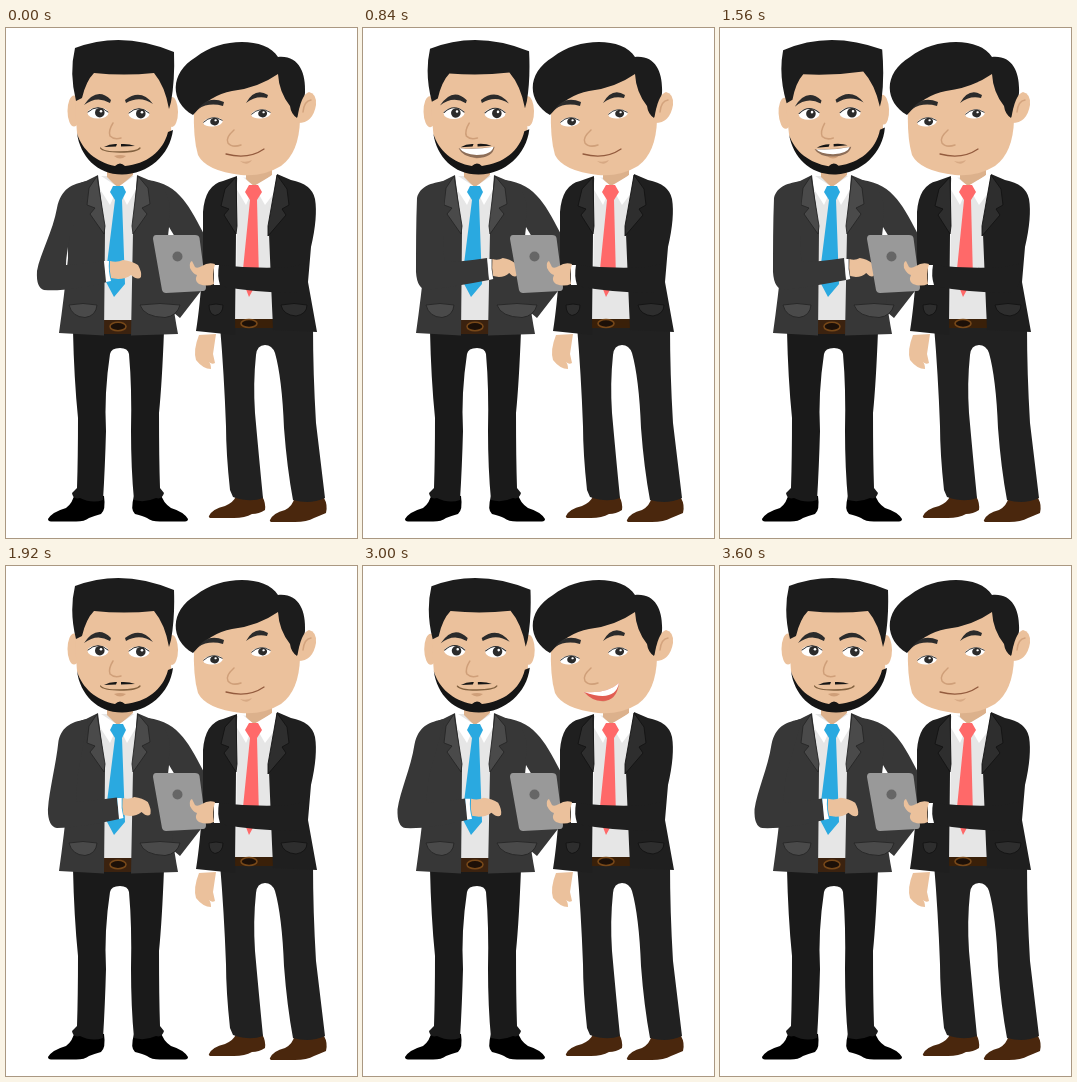
Recreate the animation shown at these times as an HTML page. Size 351 by 510 pixels, loop 3.84 s.

```html
<!DOCTYPE html>
<html lang="en">
<head>
<meta charset="utf-8">
<title>Two colleagues with a tablet</title>
<style>
  html, body { margin: 0; height: 100%; overflow: hidden; background: #fff; }
  svg { display: block; width: 100vw; height: 100vh; }
  .line { fill: none; stroke-linecap: round; stroke-linejoin: round; }
  .skin { fill: #ebc19c; }
  .coatA { fill: #373737; } .coatB { fill: #1f1f1f; }
  .legA { fill: #1a1a1a; } .legB { fill: #212121; }
  .shirt { fill: #e6e6e6; } .white { fill: #fff; }
  .hair { fill: #1c1c1c; } .iris { fill: #2b2b2b; }
  .lapelA { fill: #4a4a4a; stroke: #262626; stroke-width: .9; }
  .lapelB { fill: #2e2e2e; stroke: #141414; stroke-width: .9; }
  .buckle { fill: #1c1008; stroke: #774819; stroke-width: 1.6; }
</style>
</head>
<body>
<svg viewBox="0 0 351 510" preserveAspectRatio="none">
  <defs>
    <g id="eye">
      <ellipse class="white" rx="10.5" ry="5.6"/>
      <circle class="iris" cx="1.8" cy="-.3" r="4.8"/>
      <circle class="white" cx="3" cy="-1.8" r="1.3"/>
      <path class="line" stroke="#2b2b2b" stroke-width="1" d="M-10 -1Q0 -10 10 -1"/>
    </g>
  </defs>

  <!-- bearded man: body -->
  <g>
    <path d="M42 491Q46 484 60 480Q67 475 69 464L98 468Q100 482 95 486Q88 488 83 490Q78 494 68 493.500H45Q42 493 42 491Z"/>
    <path d="M182 491Q178 484 165 480Q157 475 154 464L128 468Q124 482 129 486Q137 488 141 490Q146 494 156 493.500H179Q182 493 182 491Z"/>
    <path class="legA" d="M67 303L158 303Q156 355 153 385Q153 430 154 460L158 465Q156 472 150 470Q139 475 128 472Q125 440 125 403Q126 360 123 326Q122 320 114 320Q105 320 104 326Q98 365 100 403Q99 440 97 472Q86 476 74 470Q67 472 66 465L71 460Q72 430 72 390Q68 350 67 303Z"/>
    <path class="coatA" d="M142 152C174 156 184 180 199 208L198 259L174 290L156 275Z"/>
    <path class="white" d="M163 199L169 209L162 208Z"/>
    <path class="shirt" d="M92 148L131 148L128 294H97Z"/>
    <path fill="#3b220f" d="M97 292H127V306H97Z"/>
    <ellipse class="buckle" cx="112" cy="298.500" rx="8" ry="4.200"/>
    <path fill="#dcb18c" d="M101 141H127V147L112 160L101 149Z"/>
    <path class="white" d="M92 146L112 159L104 177L92 158ZM131 146L112 159L121 177L131 160Z"/>
    <path fill="#2aa9e0" d="M107 158H117L120 164L116 172L119 256L108 269L99 252L109 172L104 164Z"/>
    <path class="coatA" d="M92 147L80 153Q64 157 61 174L62 230Q58 270 53 305L98 307.500L99 204Z"/>
    <path class="coatA" d="M131 147L145 153Q160 157 164 178L161 215Q165 270 172 306L125 307.500L127 204Z"/>
    <path class="lapelA" d="M91 148L83 160L81 177L89 180L84 186L98 206L99 198Z"/>
    <path class="lapelA" d="M132 148L142 160L144 176L136 180L141 186L127 206L126 198Z"/>
    <path class="lapelA" d="M63 277Q77 274 91 277Q90 288 79 289.500Q66 289 63 277ZM134 277Q154 274 174 277Q171 288 159 289.500Q138 289 134 277Z"/>
    <path class="coatA" id="sleeve"/>
  </g>

  <!-- bearded man: head -->
  <g id="head">
    <ellipse class="skin" cx="68" cy="83" rx="6.500" ry="15.500"/>
    <ellipse class="skin" cx="166" cy="84" rx="6" ry="15"/>
    <path class="skin" d="M72 42H162Q167 75 165 104C161 124 142 143 117 143C92 143 76 124 71 105Q68 75 72 42Z"/>
    <path class="hair" d="M69 20Q116 2 168 24Q169 52 165 74L163 81Q159 58 148 45Q118 48 88 45Q80 53 76 70L70 73Q63 45 69 20Z"/>
    <path fill="#151515" d="M71 105C76 122 90 134 109 138Q114 133 119 138C140 136 157 124 162 104L167 102C164 127 142 146.500 116 146.500C91 146.500 74 128 71 105Z"/>
    <use href="#eye" x="92" y="85"/>
    <use href="#eye" x="133" y="86"/>
    <path class="iris" d="M78 77Q91 58 105 72L104 75Q91 67 78 77ZM119 72Q135 60 147 76Q134 67 120 75Z"/>
    <path class="line" stroke="#cf9f79" stroke-width="1.500" d="M107 95Q102 103 104 108Q108 112 115 110"/>
    <path fill="#cf9f79" d="M108 128Q114 126 120 128Q114 133 108 128Z"/>
    <path class="line" id="lipsA" stroke="#82613f" stroke-width="1.300" d="M94.500 120Q97 124 114 124Q131 124 134 120"/>
    <path id="mouthA" fill="#8d6e58"/>
    <path class="white" id="teethA"/>
    <path fill="#151515" d="M98 119Q104 115.500 111 116L110 118.500ZM115 116Q123 115.500 129 118L115 118.500Z"/>
  </g>

  <!-- clean-shaven man: body -->
  <g>
    <path class="skin" d="M193 307Q187 322 190 332Q197 341 205 341Q205 336 203 334Q206 337 209 335L207 326L210 306Z"/>
    <path fill="#4a270d" d="M203 488Q206 481 219 478Q228 474 230 468L256 468Q260 475 259 482Q253 486 246 486Q239 490 228 490H206Q202 490 203 488ZM264 492Q267 485 279 482Q287 478 289 468L318 470Q322 477 320 485Q313 488 308 490Q301 494 289 494H267Q263 494 264 492Z"/>
    <path class="legB" d="M214 298L307 298Q307 345 310 395L319 470Q304 477 287 472Q281 440 278 400Q276 350 269 325Q266 317 259 317Q251 317 250 327Q247 355 249 385Q253 430 257 470Q244 475 227 469L224 462Q220 425 220 398Q218 345 214 298Z"/>
    <path class="shirt" d="M231 150L270 148L266 292H230Z"/>
    <path fill="#3a2009" d="M229 291H268V300H229Z"/>
    <ellipse class="buckle" cx="243" cy="295.500" rx="8" ry="4"/>
    <path fill="#dcb18c" d="M240 141H266V147L248 160L240 151Z"/>
    <path class="white" d="M233 146L248 158L240 177L230 160ZM270 145L248 158L259 177L272 160Z"/>
    <path fill="#ff6969" d="M243 157H252L256 164L251 172L253 251L243 269L236 251L244 172L239 164Z"/>
    <path class="coatB" d="M231 148L217 153Q199 157 197 184L197 235Q194 278 190 303L229 307L230 206Z"/>
    <path class="coatB" d="M271 146L285 152Q306 156 309 171Q312 189 305 219L302 254L311 304L267 302L263 206Z"/>
    <path class="lapelB" d="M230 149L219 161L215 178L223 181L218 187L230 206L231 198Z"/>
    <path class="lapelB" d="M271 147L281 161L283 177L276 181L280 187L262 208L262 198Z"/>
    <path class="lapelB" d="M203 277Q210 275 217 277Q217 286 209 287.500Q203 286 203 277ZM275 277Q288 274 301 277Q301 286 290 288Q277 287 275 277Z"/>
    <path class="coatB" d="M212 237Q250 241 284 239L303 235Q301 262 290 265Q252 265 213 258Z"/>
  </g>

  <!-- clean-shaven man: head -->
  <g>
    <path class="skin" d="M188 82Q198 50 272 42Q294 65 294 92Q293 125 275 138Q257 149 235 147Q200 143 192 127Q187 110 188 82Z"/>
    <path class="hair" d="M187 87C164 74 163 45 190 29C215 9 260 9 272 29C293 27 300 45 299 65Q297 84 291 90Q285 86 284 78Q273 64 272 46Q252 60 226 63Q204 67 187 87Z"/>
    <path class="skin" d="M291 92Q295 66 303 64Q311 66 310 77Q307 95 292 95Z"/>
    <path class="line" stroke="#d3a37d" stroke-width="1.500" d="M297 84Q298 73 305 72"/>
    <use href="#eye" transform="translate(207 94) rotate(-6) scale(.93 .8)"/>
    <use href="#eye" transform="translate(255 86) rotate(-6) scale(.93 .8)"/>
    <path class="iris" d="M192 81Q202 67 218 74L217 78Q203 74 192 81ZM240 75Q249 59 262 67L261 70Q250 67 240 75Z"/>
    <path class="line" stroke="#cf9f79" stroke-width="1.500" d="M228 102Q219 110 222 115Q226 120 235 117"/>
    <path fill="#d7a984" d="M234 133Q240 135 246 132Q241 139 234 133Z"/>
    <path class="line" id="lipsB" stroke="#935b3e" stroke-width="1.300" d="M220 126Q242 132 258 121"/>
    <path id="mouthB" fill="#e15d52"/>
    <path class="white" id="teethB"/>
  </g>

  <!-- hands and tablet -->
  <g id="hand">
    <path class="white" d="M98 233H103Q102 243 105 253L100 254Z"/>
    <path class="skin" d="M104 233Q111 235 117 232Q126 233 132 237Q136 244 135 249Q132 253 125 247Q120 251 112 251L105 250Q103 242 104 233Z"/>
  </g>
  <path fill="#999" d="M150 207L189 207Q193 207 193.500 210L200 259Q200 263 197 263L160 265Q157 265 156 262L147 211Q147 207 150 207Z"/>
  <circle cx="171.500" cy="228.500" r="5" fill="#666"/>
  <path class="white" d="M208 237H213Q211 248 214 257L208 257Z"/>
  <path class="skin" d="M209 236Q202 234 196 238Q191 241 189 239L186 233Q183 234 184 240Q187 246 191 247Q188 253 193 256Q201 259 208 256Q206 246 209 236Z"/>
</svg>
<script>
const LOOP = 3840, STEP = 120;
const $ = id => document.getElementById(id);

// linear keyframes: [time, value] pairs
function track(t, keys) {
  const i = keys.findIndex(k => k[0] > t);
  if (i < 0) return keys[keys.length - 1][1];
  if (!i) return keys[0][1];
  const [t0, a] = keys[i - 1], [t1, b] = keys[i];
  return a + (b - a) * (t - t0) / (t1 - t0);
}

// blend two paths that share the same commands
function blend(from, to, p) {
  const ends = to.match(/[\d.]+/g);
  let i = 0;
  return from.replace(/[\d.]+/g, n => +n + (ends[i++] - n) * p);
}

const shapes = {
  sleeve: [
    "M82 153C65 156 55 161 51 180C47 203 34 226 31 243Q30 260 38 262Q60 264 101 254L98 233Q75 236 60 237Q60 228 64 208Z",
    "M82 153C68 155 57 158 54 170C53 195 53 220 53 244Q54 261 64 262Q90 259 126 252L124 230Q98 234 82 234Q80 225 80 208Z"],
  mouthA: ["M95 121Q114 124 134 121Q130 124 114 124Q99 124 95 121Z", "M96 120Q114 121 132 119Q130 130 114 130Q100 129 96 120Z"],
  teethA: ["M98 122Q114 124 131 122Q128 123 114 124Q101 123 98 122Z", "M97 120Q114 122 131 119Q129 127 114 127Q101 126 97 120Z"],
  mouthB: ["M220 126Q242 132 258 121Q245 131 238 130Q230 130 220 126Z", "M221 126Q244 128 256 117Q254 135 239 135Q229 135 221 126Z"],
  teethB: ["M222 127Q242 132 256 122Q242 131 222 127Z", "M221 126Q244 128 256 117Q252 137 221 126Z"]
};
const morph = (id, p) => $(id).setAttribute("d", blend(...shapes[id], p));

function talk(side, open) {
  for (const part of ["mouth", "teeth"]) {
    morph(part + side, open);
    $(part + side).style.opacity = open > 0 ? 1 : 0;
  }
  $("lips" + side).style.opacity = open > 0.3 ? 0 : 1;
}

function draw(now) {
  const t = Math.floor(now % LOOP / STEP) * STEP;
  const reach = t < 600 ? (t / 600) ** 2 : track(t, [[1560, 1], [2160, 0.16]]);
  const nod = t > 2880 && t < 3600 ? -0.5 * Math.sin((t - 2880) / 720 * Math.PI) : 0;
  const tilt = track(t, [[720, 0], [1320, -4.5], [1920, 0]]) + nod;

  morph("sleeve", reach);
  // the hand foreshortens as it reaches for the tablet
  $("hand").setAttribute("transform",
    `translate(${101 + 26 * reach} ${-2 * reach}) scale(${1 - 0.2 * reach} 1) translate(-101)`);
  $("head").setAttribute("transform", `rotate(${tilt} 114 146)`);
  talk("A", track(t, [[0, 0], [480, 1], [1440, 1], [1920, 0]]));
  talk("B", track(t, [[2280, 0], [2760, 1], [3120, 1], [3480, 0]]));
}

const start = performance.now();
function frame() {
  draw(performance.now() - start);
  requestAnimationFrame(frame);
}
frame();
</script>
</body>
</html>
```
